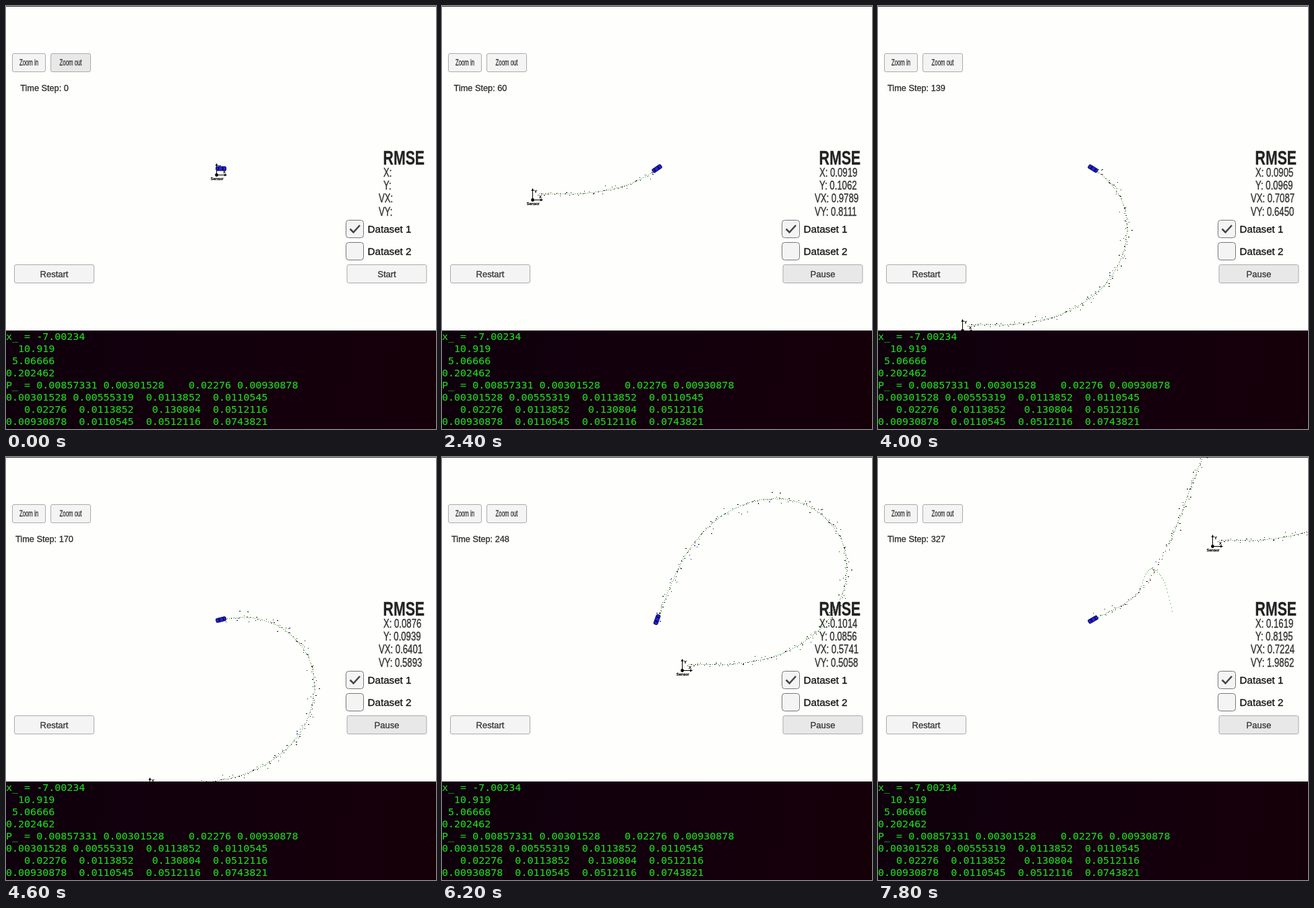
An HTML page with a canvas for the animation above (8000 ms loop, 638 by 627 pixels).

```html
<!DOCTYPE html>
<html lang="en">
<head>
<meta charset="utf-8">
<title>Tracking simulator</title>
<style>
html, body { margin: 0; width: 100%; height: 100%; overflow: hidden; background: #fefefd; }
canvas { display: block; }
</style>
</head>
<body>
<canvas id="stage" width="638" height="627"></canvas>
<script>
const ctx = document.getElementById('stage').getContext('2d');
const SANS = '"Liberation Sans", Arial, sans-serif';
const MONO = '"DejaVu Sans Mono", monospace';
const LOOP = 8000, TICK = 200, START = 1200, STEPS = 327;
const LOST = 274, FOUND = 301;
const CAR = { x: 319, y: 241 };

// car positions relative to the sensor, equally spaced in time
const track = [
  [7, -9], [80, -10], [149.5, -26], [208, -65], [241, -125], [236.3, -193], [191, -242], [125, -254],
  [59.5, -229.5], [10.5, -179.5], [-21.3, -116], [-46, -49.4], [-74.4, 16.2], [-115.8, 73.8], [-177, 109]
];

// the estimate while it has lost the car
const stray = [[-60, 96], [-73, 50], [-93, 34], [-110, 67]];

// time, step and the error of x, y, vx, vy
const readings = [
  [1200, 1, 0.2314, 0.0612, 4.8215, 1.9037],
  [1600, 14, 0.1761, 0.0765, 2.0016, 1.5229],
  [2400, 60, 0.0919, 0.1062, 0.9789, 0.8111],
  [3400, 107, 0.0935, 0.0999, 0.7774, 0.7006],
  [4600, 170, 0.0876, 0.0939, 0.6401, 0.5893],
  [6200, 248, 0.1014, 0.0856, 0.5741, 0.5058],
  [7800, STEPS, 0.1619, 0.8195, 0.7224, 1.9862]
];

const log = [
  'x_ = -7.00234', '  10.919', ' 5.06666', '0.202462',
  'P_ = 0.00857331 0.00301528    0.02276 0.00930878',
  '0.00301528 0.00555319  0.0113852  0.0110545',
  '   0.02276  0.0113852   0.130804  0.0512116',
  '0.00930878  0.0110545  0.0512116  0.0743821'
];

function readingAt(t) {
  const i = Math.max(1, readings.findIndex(r => r[0] >= t));
  const a = readings[i - 1], b = readings[i];
  const u = (t - a[0]) / (b[0] - a[0]);
  const [, step, ...errors] = a.map((v, k) => v + (b[k] - v) * u);
  return { step: Math.round(step), errors };
}

// Catmull-Rom curve through the points, u from 0 to 1
function curve(points, u) {
  const last = points.length - 1;
  const i = Math.min(last - 1, Math.floor(u * last)), s = u * last - i;
  return [0, 1].map(k => {
    const b = points[i][k], c = points[i + 1][k];
    const a = i > 0 ? points[i - 1][k] : 2 * b - c;
    const d = i + 2 <= last ? points[i + 2][k] : 2 * c - b;
    return b + s / 2 * (c - a + s * (2 * a - 5 * b + 4 * c - d + s * (3 * (b - c) + d - a)));
  });
}

const carAt = n => curve(track, n / STEPS);

function random(n, salt) {
  const v = Math.sin(n * 12.9898 + salt * 78.233) * 43758.5453;
  return v - Math.floor(v);
}

// roughly normal, unit deviation
const noise = (n, salt) => (random(n, salt) + random(n, salt + 1) + random(n, salt + 2) - 1.5) * 2;

function text(str, x, y, font, color, align = 'left', squeeze = 1, weight = 0.3) {
  ctx.save();
  ctx.translate(x, y);
  ctx.scale(squeeze, 1);
  ctx.font = font;
  ctx.textAlign = align;
  ctx.fillStyle = ctx.strokeStyle = color;
  ctx.lineWidth = weight;
  ctx.fillText(str, 0, 0);
  ctx.strokeText(str, 0, 0);
  ctx.restore();
}

function box(x, y, w, h, r, fill, edge) {
  ctx.beginPath();
  ctx.roundRect(x + 0.5, y + 0.5, w - 1, h - 1, r);
  ctx.fillStyle = fill;
  ctx.fill();
  ctx.strokeStyle = edge;
  ctx.lineWidth = 1;
  ctx.stroke();
}

function button(label, x, y, w, active, size = 13, squeeze = 1) {
  box(x, y, w, 28, 2.5, active ? '#e8e8e8' : '#f4f4f4', '#ababab');
  text(label, x + w / 2, y + 14 + size * 0.36, size + 'px ' + SANS, '#333', 'center', squeeze);
}

function checkbox(label, y, checked) {
  box(504, y, 27, 27, 4, '#f4f4f4', '#777');
  if (checked) {
    ctx.beginPath();
    ctx.moveTo(510.5, y + 13.5);
    ctx.lineTo(515.5, y + 18.5);
    ctx.lineTo(525, y + 8);
    ctx.strokeStyle = '#444';
    ctx.lineWidth = 2.5;
    ctx.stroke();
  }
  text(label, 536.5, y + 18.7, '15.2px ' + SANS, '#111');
}

function dot(x, y, color, w = 1) {
  ctx.fillStyle = color;
  ctx.fillRect(Math.round(x), Math.round(y), w, 1);
}

function drawTrail(step, ox, oy) {
  for (let n = 1; n <= step; n++) {
    const [x, y] = carAt(n);
    const lost = n >= LOST && n < FOUND;
    const [ex, ey] = lost ? curve(stray, (n - LOST) / (FOUND - LOST)) : [x, y];
    dot(ox + ex, oy + ey, '#2aa52a');
    if (n % 2) {
      dot(ox + x + noise(n, 11) * 1.5, oy + y + noise(n, 21) * 1.5, random(n, 6) < 0.4 ? '#a02020' : '#241010');
    } else {
      const turn = noise(n, 31) * 0.026, stretch = 1 + noise(n, 41) * 4 / Math.hypot(x, y, 30);
      const c = Math.cos(turn) * stretch, s = Math.sin(turn) * stretch;
      dot(ox + x * c - y * s, oy + x * s + y * c, random(n, 7) < 0.4 ? '#18187c' : '#0c0c0c', random(n, 8) < 0.4 ? 2 : 1);
    }
  }
}

function drawSensor(x, y) {
  ctx.fillStyle = '#000';
  ctx.fillRect(x, y - 14, 1, 14);
  ctx.fillRect(x, y, 15, 1);
  ctx.beginPath();
  ctx.arc(x + 0.5, y + 0.5, 2.4, 0, Math.PI * 2);
  ctx.moveTo(x + 0.5, y - 17);
  ctx.lineTo(x + 2.5, y - 13);
  ctx.lineTo(x - 1.5, y - 13);
  ctx.moveTo(x + 16, y + 0.5);
  ctx.lineTo(x + 12, y + 2.5);
  ctx.lineTo(x + 12, y - 1.5);
  ctx.fill();
  const font = '6px ' + SANS;
  text('Y', x + 3, y - 10, font, '#000');
  text('X', x + 10, y - 2, font, '#000');
  text('Sensor', x + 1, y + 8, font, '#000', 'center');
}

function drawCar(step) {
  const a = carAt(Math.max(0, step - 1)), b = carAt(Math.max(1, step));
  ctx.save();
  ctx.translate(CAR.x, CAR.y);
  ctx.rotate(Math.atan2(b[1] - a[1], b[0] - a[0]));
  ctx.fillStyle = '#0c0c58';
  ctx.beginPath();
  ctx.roundRect(-8, -3.5, 16, 7, 2.5);
  ctx.fill();
  ctx.fillStyle = '#2222dc';
  ctx.beginPath();
  ctx.roundRect(-7, -2.6, 14, 5.2, 2);
  ctx.fill();
  ctx.fillStyle = '#0a0a40';
  ctx.fillRect(-4.6, -2.2, 1.6, 4.4);
  ctx.fillRect(1.6, -2.4, 2, 4.8);
  ctx.restore();
}

function drawPanel(step, errors, running) {
  button('Zoom in', 9, 70, 50, false, 12, 0.65);
  button('Zoom out', 66, 70, 60, !running, 12, 0.65);
  text('Time Step: ' + step, 57, 126, '13px ' + SANS, '#2a2a2a', 'center', 0.98);
  text('RMSE', 559.5, 234.5, 'bold 30px ' + SANS, '#222', 'left', 0.71);
  ['X:', 'Y:', 'VX:', 'VY:'].forEach((name, i) => {
    const label = running ? name + ' ' + errors[i].toFixed(4) : name;
    text(label, i < 2 ? 560 : 553, 253 + i * 19.2, '18px ' + SANS, '#333', 'left', 0.73, 0.4);
  });
  checkbox('Dataset 1', 317, true);
  checkbox('Dataset 2', 350, false);
  button('Restart', 12, 383, 119, false);
  button(running ? 'Pause' : 'Start', 505.5, 383, 119, running);
}

function drawTerminal() {
  const shade = ctx.createLinearGradient(0, 481, 638, 627);
  shade.addColorStop(0, '#0e000c');
  shade.addColorStop(0.6, '#14000d');
  shade.addColorStop(1, '#150008');
  ctx.fillStyle = shade;
  ctx.fillRect(0, 481, 638, 146);
  log.forEach((line, i) => text(line, 0, 495 + i * 18, '13.4px ' + MONO, '#1fd81f', 'left', 1.12, 0.1));
}

function draw(time) {
  const t = Math.floor(time % LOOP / TICK) * TICK;
  const running = t >= START;
  const { step, errors } = running ? readingAt(t) : { step: 0, errors: [] };
  const [x, y] = carAt(step);
  const ox = Math.round(CAR.x - x), oy = Math.round(CAR.y - y);
  ctx.fillStyle = '#fefefd';
  ctx.fillRect(0, 0, 638, 627);
  drawTrail(step, ox, oy);
  drawSensor(ox, oy);
  drawCar(step);
  drawPanel(step, errors, running);
  ctx.fillStyle = '#333';
  ctx.fillRect(0, 0, 638, 1);
  drawTerminal();
}

const begin = performance.now();
function loop() {
  draw(performance.now() - begin);
  requestAnimationFrame(loop);
}
loop();
</script>
</body>
</html>
```
